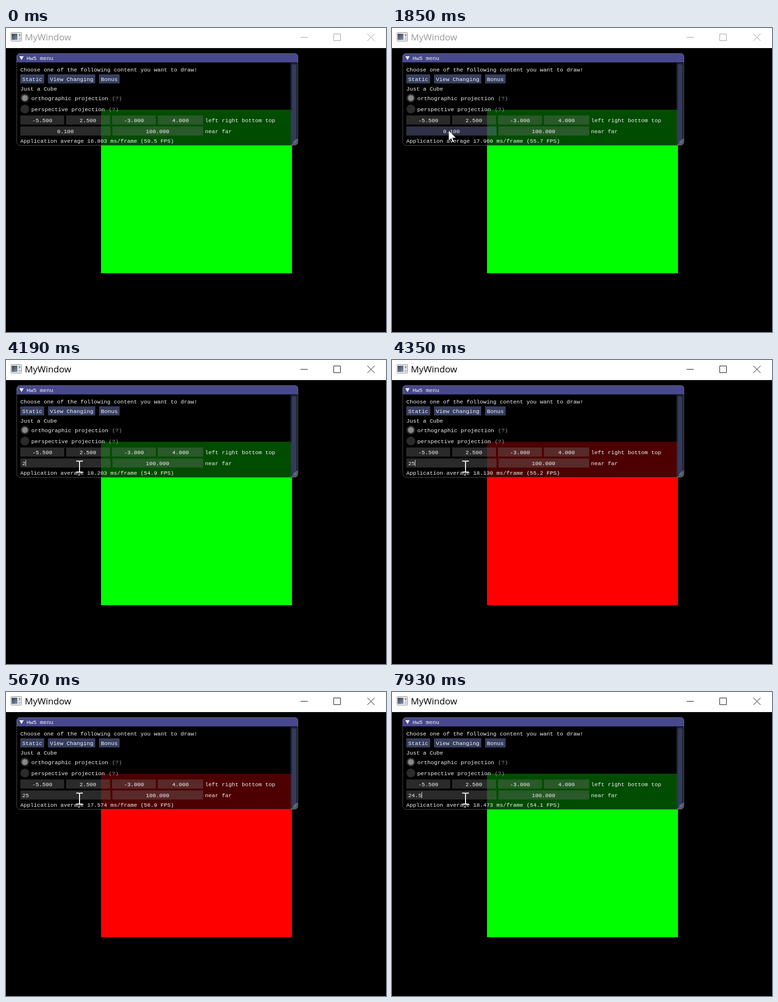
Write an HTML page that moves like this. It is 796 px wide and 636 px high and loops after 8 s.

```html
<!DOCTYPE html>
<html lang="en">
<head>
<meta charset="utf-8">
<title>Projection menu</title>
<style>
  html, body { margin: 0; width: 100%; height: 100%; overflow: hidden; background: #000; }
  svg { display: block; width: 796px; height: 636px; }
  .mono { font: 11.67px "Liberation Mono", monospace; fill: #f2f2f2; white-space: pre; }
  .dim { fill: #999; }
  .title { font: 18.8px "Open Sans", "Noto Sans", sans-serif; }
  .field { fill: #6e6e6e; fill-opacity: .39; }
  .button { fill: #373f60; }
</style>
</head>
<body>
<svg viewBox="0 0 796 636">
  <defs>
    <linearGradient id="pane" x2="1" y2="1">
      <stop stop-color="#2f3f55"/><stop offset="1" stop-color="#8a97a8"/>
    </linearGradient>
  </defs>
  <rect width="796" height="636"/>
  <rect width="796" height="42" fill="#fff"/>
  <g>
    <rect x="10.5" y="9.5" width="22" height="18" rx="1" fill="#f4f4f4" stroke="#858585"/>
    <rect x="12" y="12" width="12" height="13" fill="url(#pane)"/>
    <path d="M26 12h5v6h-5zM26 20h5v5h-5z" fill="#c3c7cc"/>
    <path d="M28.5 13v4" stroke="#68707c"/>
  </g>
  <text id="caption" class="title" x="39.5" y="26">MyWindow</text>
  <path id="controls" d="M617 19.5h15M686.5 12.5h14v14h-14zM757 12l15 15M772 12l-15 15" fill="none"/>

  <rect id="cube" x="199" y="171" width="400" height="342"/>

  <rect x="22" y="53" width="590" height="193" rx="7" fill-opacity=".7"/>
  <path d="M22 72V60a7 7 0 0 1 7-7h576a7 7 0 0 1 7 7v12z" fill="#48488d"/>
  <path d="M596 73h15v165a7 7 0 0 1-7 7h-8z" fill="#33404d" fill-opacity=".6"/>
  <rect x="599" y="76" width="9" height="165" rx="3" fill="#6666cc" fill-opacity=".3"/>
  <path d="M596 245.500L611.500 230v8.500a7 7 0 0 1-7 7z" fill="#fff" fill-opacity=".24"/>
  <path d="M601 240l7.500-7.500" stroke="#5c628c" stroke-width="1.500"/>
  <rect x="22.500" y="53.500" width="589" height="192" rx="7" fill="none" stroke="#808080" stroke-opacity=".6"/>
  <path d="M28 59h9l-4.500 8z" fill="#f2f2f2"/>
  <g id="ui"></g>
  <rect id="selection" x="34" y="208" width="36" height="15" fill="#00f" fill-opacity=".35"/>
  <text id="near" class="mono" y="220"></text>
  <path id="caret" stroke="#e6e6e6"/>
  <text id="stats" class="mono" x="30" y="240"></text>

  <path id="arrow" d="M0 0V22.400L5.300 17.500 8.800 25.800 12 24.400 8.500 16.200H15.800Z"
    fill="#fff" stroke="#000" stroke-width=".8"/>
  <path id="beam" d="M-7 -11.500h5.500l1.500 1 1.500-1h5.500M-7 11.500h5.500l1.500-1 1.500 1h5.500M0 -11V11"
    fill="none" stroke="#fff" stroke-width="2"/>
</svg>
<script>
const LOOP = 8000, STEP = 77.7, LAST = 102;
const $ = id => document.getElementById(id);
const set = (el, attrs) => { for (const k in attrs) el.setAttribute(k, attrs[k]); return el; };
const show = (el, on) => set(el, { visibility: on ? "visible" : "hidden" });
const ui = $("ui");

function add(tag, attrs, text = "") {
  const el = set(document.createElementNS(ui.namespaceURI, tag), attrs);
  el.textContent = text;
  return ui.appendChild(el);
}
const label = (x, y, text, cls = "") => add("text", { x, y, class: "mono " + cls }, text);
const box = (x, y, width, cls) => add("rect", { x, y, width, height: 19, class: cls });

function field(x, y, width, text, textX) {
  const el = box(x, y, width, "field");
  if (text) label(textX, y + 14, text);
  return el;
}
function button(x, width, text) {
  box(x, 97, width, "button");
  label(x + 4, 111, text);
}
function radio(y, text, on) {
  add("circle", { cx: 39.5, cy: y, r: 9.2, class: "field" });
  if (on) add("circle", { cx: 39.5, cy: y, r: 6.2, fill: "#e6e6e6", "fill-opacity": .5 });
  label(53, y + 4.5, text);
  label(61 + text.length * 7, y + 4.5, "(?)", "dim");
}

label(43, 67, "Hw5 menu");
label(30, 91, "Choose one of the following content you want to draw!");
button(30, 50, "Static");
button(88, 99, "View Changing");
button(195, 43, "Bonus");
label(30, 131, "Just a Cube");
radio(146.5, "orthographic projection", true);
radio(169.5, "perspective projection", false);
field(30, 183, 92, "-5.500", 55);
field(126, 183, 92, "2.500", 154);
field(222, 183, 92, "-3.000", 247);
field(318, 183, 95, "4.000", 348);
label(417, 197, "left right bottom top");
const nearBox = field(30, 206, 189);
field(223, 206, 190, "100.000", 293);
label(417, 220, "near far");

// All keys below start with the step at which they apply.
const FOCUS = 27, EDIT = 34;
const typed = [[EDIT, "0.100"], [49, "2"], [55, "25"], [74, "2"], [76, "24"], [81, "24."], [93, "24.5"]];
const pointer = [[1, 686, 558], [11, 158, 236], [12, 141, 233], [16, 110, 221], [18, 107, 215],
  [22, 113, 213.5], [26, 124, 214], [38, 124, 215], [40, 139, 217], [42, 154, 223]];
const frameMs = [[0, 16.803], [12, 17.627], [36, 18.294], [54, 18.203], [72, 17.546], [83, 17.852], [LAST, 18.473]];

function at(keys, n, ease = u => u) {
  let i = 0;
  while (i < keys.length - 2 && n >= keys[i + 1][0]) i++;
  const [a, b] = [keys[i], keys[i + 1]];
  const u = ease(Math.min(1, Math.max(0, (n - a[0]) / (b[0] - a[0]))), i);
  return a.slice(1).map((v, k) => v + (b[k + 1] - v) * u);
}

function render(t) {
  const n = Math.min(LAST, Math.floor((t + 20) / STEP));
  const focused = n >= FOCUS, editing = n >= EDIT;
  const ink = focused ? "#000" : "#999";
  set($("caption"), { fill: ink });
  set($("controls"), { stroke: ink });

  const [since, text] = typed.filter(k => n >= k[0]).pop() || [0, "0.100"];
  set($("cube"), { fill: editing && parseFloat(text) >= 25 ? "#f00" : "#0f0" });

  const pressed = n >= FOCUS && n < FOCUS + 3;
  const hovered = n >= 23 && !editing;
  nearBox.style.fill = pressed ? "#6b69a3" : hovered ? "#7878b0" : "";
  nearBox.style.fillOpacity = pressed ? .69 : hovered ? .4 : "";

  $("near").textContent = text;
  set($("near"), { x: editing ? 34 : 107 });
  show($("selection"), editing && since === EDIT);
  const end = 34.5 + text.length * 7;
  set($("caret"), { d: `M${end} 209v13` });
  // The caret stays lit for a while after each key, then blinks.
  const idle = (n - since) * STEP / 1000 - .3;
  show($("caret"), editing && (idle < 0 || idle % 1.2 <= .8));

  const ms = at(frameMs, n)[0];
  $("stats").textContent = `Application average ${ms.toFixed(3)} ms/frame (${(1000 / ms).toFixed(1)} FPS)`;

  const [x, y] = at(pointer, n, (u, i) => i ? u : 1 - (1 - u) ** 1.4);
  const place = { transform: `translate(${x} ${y})` };
  show(set($("arrow"), place), n > 0 && !editing);
  show(set($("beam"), place), editing);
}

const start = performance.now();
function tick() {
  render((performance.now() - start) % LOOP);
  requestAnimationFrame(tick);
}
tick();
</script>
</body>
</html>
```
